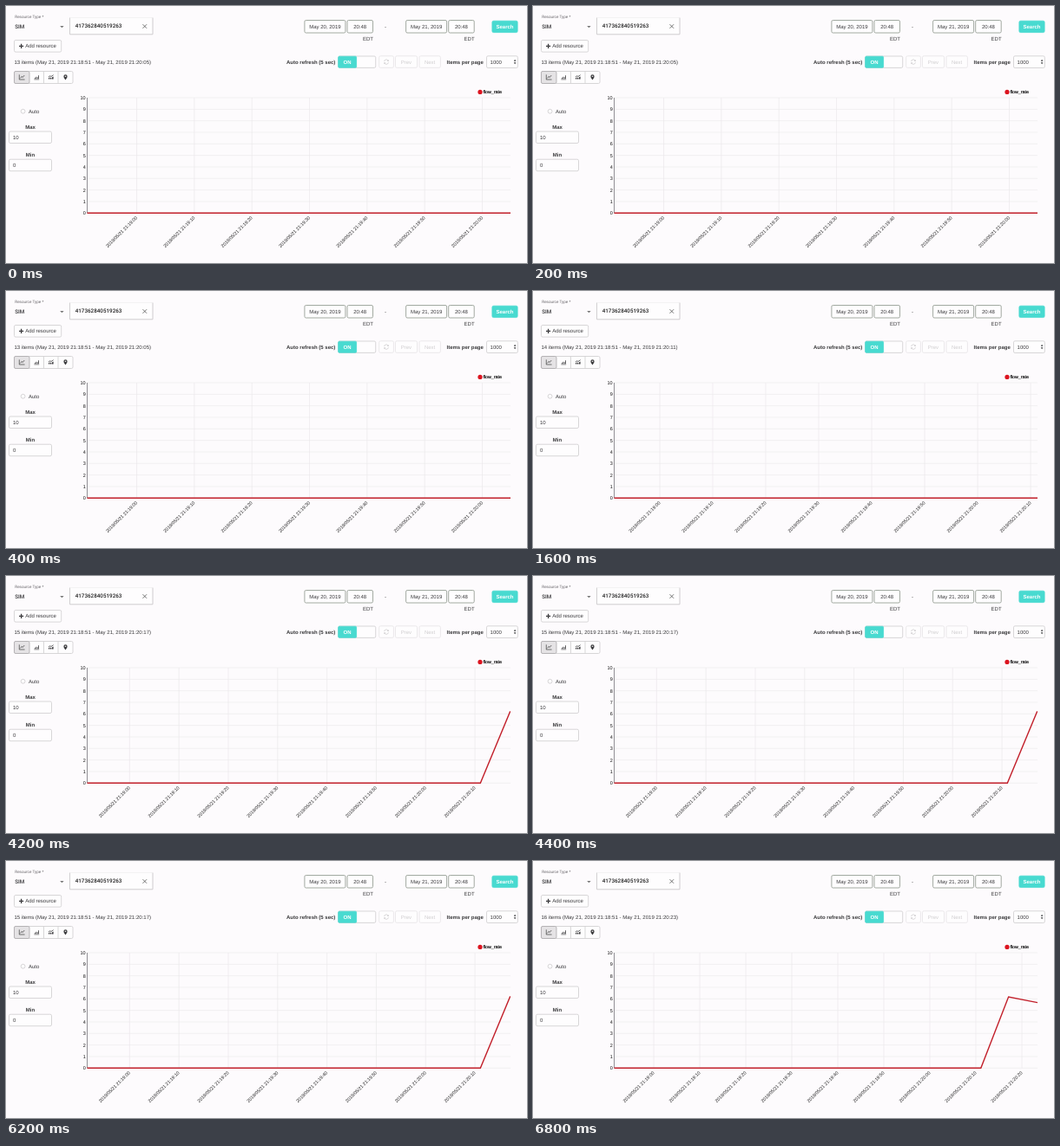
An HTML page that plays this animation: 600x297 px, repeating every 8 s.

```html
<!DOCTYPE html>
<html lang="en">
<head>
<meta charset="utf-8">
<title>Resource data chart</title>
<style>
html, body { margin: 0; width: 100%; height: 100%; overflow: hidden; background: #fdfbfd; }
svg { display: block; width: 600px; height: 297px; }
text { font-family: "Liberation Sans", Arial, sans-serif; text-rendering: geometricPrecision; white-space: pre; }
</style>
</head>
<body>
<svg id="stage" viewBox="0 0 600 297"><g id="panel"></g><g id="plot"></g></svg>
<script>
const LOOP = 8000;
const LEFT = 93.5, RIGHT = 581, TOP = 106, BASE = 239.3;
const FIRST_TICK = 8.6; // seconds from the left edge to 21:19:00
const TEAL = '#48dad0', RED = '#c2202b', INK = '#3a3a3c';

const PHASES = [
  { from: 0, items: 13, end: '21:20:05', span: 73.5 },
  { from: 1600, items: 14, end: '21:20:11', span: 79.9 },
  { from: 4200, items: 15, end: '21:20:17', span: 85.8 },
  { from: 6800, items: 16, end: '21:20:23', span: 92 }
];
const SAMPLES = [[0, 0], [79.7, 0], [85.7, 6.17], [92, 5.68]];

const text = (x, y, str, { size = 6, fill = INK, anchor = 'start', more = '' } = {}) =>
  `<text x="${x}" y="${y}" font-size="${size}" fill="${fill}" text-anchor="${anchor}" ${more}>${str}</text>`;
const rect = (x, y, w, h, fill = '#fefdfe', stroke = '#cfcdcf', r = 1.6) =>
  `<rect x="${x}" y="${y}" width="${w}" height="${h}" rx="${r}" fill="${fill}" stroke="${stroke}" stroke-width=".8"/>`;
const path = (d, stroke = INK, width = 1, fill = 'none') =>
  `<path d="${d}" stroke="${stroke}" stroke-width="${width}" fill="${fill}"/>`;
const solid = (d, fill = INK) => path(d, 'none', 0, fill);
const bold = 'font-weight="bold"';
const roboto = 'style="font-family:Roboto,sans-serif"';
const medium = roboto + ' font-weight="500"';

function dateField(x, date) {
  const edge = '#8b958a';
  return rect(x, 16.5, 47, 14.5, '#fefdfe', edge) +
    text(x + 23.5, 26, date, { anchor: 'middle' }) +
    rect(x + 49.1, 16.5, 29.5, 14.5, '#fefdfe', edge) +
    text(x + 63.8, 26, '20:48', { anchor: 'middle' }) +
    text(x + 79, 40.4, 'EDT', { anchor: 'end' });
}

function numberField(y, label, value) {
  return text(28, y - 2.8, label, { anchor: 'middle', more: bold }) +
    rect(3.5, y, 49, 13.5) + text(8, y + 8.7, value);
}

function iconButtons() {
  let out = rect(9.5, 75.5, 67.5, 14) +
    rect(9.5, 75.5, 17.5, 14, '#e5e3e5', '#aaa8aa') +
    path('M43.5 75.5V89.5M60 75.5V89.5', '#cfcdcf', .8);
  out += path('M15.3 79.3V85H21.6', INK, .7) + path('M16.6 83.4L18 81.4L19.3 82.5L21.2 80', INK, .7);
  out += path('M32.4 84.9H38.2', INK, .6) +
    path('M33.4 84.2V82.8M34.8 84.2V81.8M36.2 84.2V82.2M37.5 84.2V80.2', INK, .8);
  out += solid('M49 84.6V83.2L50.4 82.3V84.6ZM51 84.6V82.8L52.4 83V84.6ZM53 84.6V82.6L54.6 81.4V84.6Z') +
    path('M49 82L50.6 80.8L52 81.5L54.6 79.7', INK, .8);
  out += solid('M68.5 85.6C67.7 84 66.4 83 66.4 81.3A2.1 2.1 0 0 1 70.6 81.3C70.6 83 69.3 84 68.5 85.6Z') +
    '<circle cx="68.5" cy="81.3" r=".8" fill="#fefdfe"/>';
  return out;
}

function panel() {
  const pale = { fill: '#cfcdcf', anchor: 'middle' };
  return [
    text(10.3, 13.8, 'Resource Type *', { size: 4.6, fill: '#68666a', more: roboto }),
    text(10.2, 25.8, 'SIM', { size: 6.3, more: medium }),
    solid('M62.2 22.9H66.6L64.4 25.3Z', '#777'),
    rect(73.5, 13.5, 95.5, 19.2, '#fefdfe', '#f2f0f2', .8),
    path('M73.5 13.5V32.8H169V13.5', '#c9c7c9', .8),
    text(79.7, 25.4, '417362840519263', { size: 6.3, fill: '#222', more: medium }),
    path('M157.5 21.2L162.1 25.8M162.1 21.2L157.5 25.8', '#555', .8),
    dateField(343.9, 'May 20, 2019'),
    text(437, 26, '-', { anchor: 'middle' }),
    dateField(460.6, 'May 21, 2019'),
    rect(559.9, 17.2, 29.2, 13.4, TEAL, TEAL),
    text(574.5, 26, 'Search', { fill: '#fff', anchor: 'middle', more: bold }),
    rect(9.5, 39.5, 54.2, 13.6),
    path('M15 46.3H20.2M17.6 43.7V48.9', INK, 1.3),
    text(22.2, 48.4, 'Add resource'),
    text(323, 66.6, 'Auto refresh (5 sec)', { more: bold }),
    rect(382.7, 58, 43, 13.4),
    rect(382.7, 58.2, 20.9, 13, TEAL, TEAL, 1.2),
    text(393.1, 66.9, 'ON', { fill: '#fff', anchor: 'middle', more: bold }),
    rect(429.7, 57.8, 16.7, 13.5, '#fefdfe', '#e6e4e6'),
    path('M435.6 64A2.4 2.4 0 0 1 440 63M440.4 65.2A2.4 2.4 0 0 1 436 66.2', '#cfcdcf', .8),
    solid('M440.8 61.9V64H438.7ZM435.2 67.3V65.2H437.3Z', '#cfcdcf'),
    rect(448.5, 57.8, 25, 13.5, '#fefdfe', '#e6e4e6'),
    text(460.8, 66.7, 'Prev', pale),
    rect(476, 57.8, 24.4, 13.5, '#fefdfe', '#e6e4e6'),
    text(488.1, 66.7, 'Next', pale),
    text(507.5, 66.6, 'Items per page', { more: bold }),
    rect(553.5, 57.8, 35.8, 13.7),
    text(557.6, 66.7, '1000'),
    solid('M584.8 63.8L586.1 61.8L587.4 63.8ZM584.8 65.2L586.1 67.2L587.4 65.2Z'),
    iconButtons(),
    '<circle cx="19.6" cy="121.7" r="2.4" fill="#fefdfe" stroke="#bdbbbd" stroke-width=".6"/>',
    text(26, 123.9, 'Auto'),
    numberField(145, 'Max', '10'),
    numberField(177.2, 'Min', '0'),
    '<circle cx="546" cy="99.4" r="2.6" fill="#dc1420"/>',
    text(549.4, 101, 'flow_rate', { size: 5.3, fill: '#000', more: 'stroke="#000" stroke-width=".15"' })
  ].join('');
}

function plot({ items, end, span }) {
  const px = s => LEFT + s / span * (RIGHT - LEFT);
  const py = v => BASE - v / 10 * (BASE - TOP);
  let out = text(9.4, 66.6, `${items} items (May 21, 2019 21:18:51 - May 21, 2019 ${end})`, { size: 6.06 });

  for (let v = 0; v <= 10; v++) {
    out += path(`M${LEFT} ${py(v)}H${RIGHT}`, '#edebed', .7) +
      text(91.7, py(v) + 1.9, v, { size: 5.5, fill: '#111', anchor: 'end' });
  }
  for (let s = FIRST_TICK, n = 0; s < span; s += 10, n++) {
    const x = px(s), ex = x + 1, ey = 245.1;
    const clock = `21:${19 + Math.floor(n / 6)}:${n % 6}0`;
    out += path(`M${x} ${TOP}V${BASE}`, '#ebe9eb', .7) +
      text(ex, ey, `2019/05/21 ${clock}`, {
        size: 5.3, fill: '#222', anchor: 'end', more: `transform="rotate(-45 ${ex} ${ey})"`
      });
  }
  out += path(`M${LEFT} ${TOP}V${BASE}`, '#77757a', .8);

  const pts = SAMPLES.filter(p => p[0] <= span);
  if (pts[pts.length - 1][0] < span) pts.push([span, pts[pts.length - 1][1]]);
  return out + path('M' + pts.map(([s, v]) => `${px(s)} ${py(v)}`).join('L'), RED, 1.4);
}

const plotNode = document.getElementById('plot');
document.getElementById('panel').innerHTML = panel();
let shown = null;

function draw(now) {
  const t = now % LOOP;
  const phase = PHASES.filter(p => p.from <= t).pop();
  if (phase !== shown) {
    plotNode.innerHTML = plot(phase);
    shown = phase;
  }
}

draw(0);
let start = null;
requestAnimationFrame(function tick(now) {
  if (start === null) start = now;
  draw(now - start);
  requestAnimationFrame(tick);
});
</script>
</body>
</html>
```
